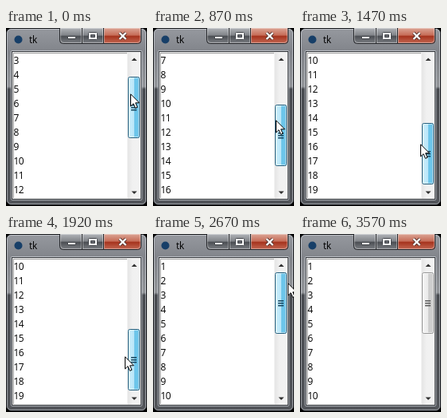
An HTML page with a canvas for the animation above (4030 ms loop, 177x223 px).

```html
<!DOCTYPE html>
<html lang="en">
<head>
<meta charset="utf-8">
<title>tk</title>
<style>
  html, body { margin: 0; width: 100%; height: 100%; overflow: hidden; background: #000; }
  canvas { display: block; }
</style>
</head>
<body>
<canvas id="stage" width="177" height="223"></canvas>
<script>
const ctx = document.getElementById('stage').getContext('2d');
const LOOP = 4030, STEP = 150, LEAD = 30;
const TOP = 48, THUMB = 77, ROW_TRAVEL = 7.9, ROWS = 10, ROW_HEIGHT = 18;
const RELEASE = 21, GONE = 24; // steps: pointer on the window edge, pointer hidden

// Key points as [step, ...values], joined by straight lines
const thumbPath = [[0, 61], [1, 68], [4, 83], [8, 108], [9, 119], [13, 119], [16, 80], [18, TOP]];
const pointerPath = [
  [0, 156, 82], [4, 155, 102], [8, 153, 127], [12, 148, 163], [13, 149, 153],
  [16, 164, 96], [18, 169, 61], [20, 174, 35], [21, 172, 122], [22, 164, 154], [23, 160, 202]
];

function along(path, step) {
  const next = path.findIndex(key => key[0] > step);
  if (next < 0) return path[path.length - 1].slice(1);
  const [from, to] = [path[next - 1], path[next]];
  const part = (step - from[0]) / (to[0] - from[0]);
  return from.slice(1).map((v, i) => Math.round(v + (to[i + 1] - v) * part));
}

function gradient(x0, y0, x1, y1, stops) {
  const g = ctx.createLinearGradient(x0, y0, x1, y1);
  for (const [at, color] of stops) g.addColorStop(at, color);
  return g;
}

function box(x, y, w, h, fill) {
  ctx.fillStyle = fill;
  ctx.fillRect(x, y, w, h);
}

function paint(fill, stroke) {
  if (fill) { ctx.fillStyle = fill; ctx.fill(); }
  if (stroke) { ctx.strokeStyle = stroke; ctx.lineWidth = 1; ctx.stroke(); }
}

function round(x, y, w, h, radius, fill, stroke) {
  ctx.beginPath();
  ctx.roundRect(x + .5, y + .5, w - 1, h - 1, radius);
  paint(fill, stroke);
}

function polygon(points, fill, stroke) {
  ctx.beginPath();
  for (const [x, y] of points) ctx.lineTo(x, y);
  ctx.closePath();
  paint(fill, stroke);
}

function text(content, x, y, spacing) {
  ctx.fillStyle = '#000';
  ctx.font = '12px "Open Sans", sans-serif';
  ctx.letterSpacing = spacing + 'px';
  ctx.fillText(content, x, y);
}

function captionButton(x, w, radius, light, upper, lower) {
  const shine = gradient(0, 0, 0, 20, [[0, light], [.46, upper], [.5, lower], [1, upper]]);
  round(x, -1, w, 21, radius, shine, '#24262a');
  round(x + 1, 0, w - 2, 19, radius, null, 'rgba(255,255,255,.38)');
}

function drawCross(x, y, color, width) {
  ctx.strokeStyle = color;
  ctx.lineWidth = width;
  ctx.beginPath();
  for (const side of [-4, 4]) {
    ctx.moveTo(x - side, y - 4);
    ctx.lineTo(x + side, y + 4);
  }
  ctx.stroke();
}

function drawWindow() {
  box(0, 0, 177, 223, '#000');
  round(0, 0, 177, 222, 6, gradient(0, 0, 0, 222,
    [[0, '#96999f'], [.13, '#82858b'], [.33, '#94979b'], [.345, '#4b4e53'], [1, '#53565b']]), '#15171a');
  round(1, 1, 175, 220, 5, null, 'rgba(220,225,230,.55)');

  ctx.beginPath();
  ctx.arc(15.5, 14.5, 5, 0, Math.PI * 2);
  paint('#173f68');
  text('tk', 29, 19, -.3);

  captionButton(67, 29, [0, 0, 0, 4], '#b0b3b7', '#808388', '#4a4d52');
  captionButton(95, 28, 0, '#b0b3b7', '#808388', '#4a4d52');
  captionButton(122, 48, [0, 0, 4, 0], '#dba494', '#c66c57', '#a5321c');
  round(77, 10, 11, 4, 0, '#fff', '#45484d');
  round(103, 5, 12, 10, 1, '#fff', '#45484d');
  round(106, 8, 6, 4, 0, '#666970', '#45484d');
  drawCross(146.5, 10, '#56352f', 4);
  drawCross(146.5, 10, '#fff', 2.3);

  round(6, 28, 165, 188, 1, null, 'rgba(220,225,230,.65)');
  box(7, 29, 163, 186, '#33363a');
  box(8, 30, 161, 184, '#f0f0f0');
  box(9, 31, 143, 182, '#a0a0a0');
  box(10, 32, 142, 181, '#fff');
}

function drawList(first) {
  for (let i = 0; i < ROWS; i++) text(first + i, 9.5, 45 + i * ROW_HEIGHT, -.7);
}

function drawScrollbar(top, pressed) {
  box(153, 31, 16, 183, gradient(153, 0, 169, 0, [[0, '#e5e5e5'], [.35, '#f0f0f0'], [1, '#f3f3f3']]));
  for (const [y, tip] of [[41, 37.5], [204.5, 208]]) {
    polygon([[157.5, y], [161, tip], [164.5, y]], '#303030');
  }
  const [light, mid, dark, border, grip] = pressed
    ? ['#d0f0fc', '#b6e5f8', '#6cc5ea', '#24607f', '#17465f']
    : ['#f6f6f6', '#e9e9e9', '#cdcdcd', '#979797', '#5c5c5c'];
  round(153, top, 15, THUMB, 2,
    gradient(154, 0, 168, 0, [[0, light], [.48, mid], [.5, dark], [1, dark]]), border);
  round(154, top + 1, 13, THUMB - 2, 1, null, 'rgba(255,255,255,.5)');
  for (let y = top + 35; y <= top + 41; y += 3) box(157, y, 7, 1.5, grip);
}

function drawArrow(x, y) {
  const shape = [[.5, .8], [.5, 16], [4, 12.7], [6.5, 18.4], [9, 17.3], [6.6, 11.8], [11.4, 11.8]];
  polygon(shape.map(([dx, dy]) => [x + dx, y + dy]), '#fff', '#000');
}

function drawResize(x, y) {
  const wing = [[-11, 0], [-6, -4], [-6, -1.5]];
  const flip = (sx, sy) => wing.map(([dx, dy]) => [x + .5 + dx * sx, y + .5 + dy * sy]);
  polygon([...flip(1, 1), ...flip(-1, 1).reverse(),
    ...flip(-1, -1), ...flip(1, -1).reverse()], '#fff', '#000');
}

function draw(time) {
  const step = Math.floor((time % LOOP + LEAD) / STEP);
  const [top] = along(thumbPath, step);
  const [x, y] = along(pointerPath, step);
  drawWindow();
  drawList(1 + Math.round((top - TOP) / ROW_TRAVEL));
  drawScrollbar(top, step < RELEASE);
  if (step === RELEASE) drawResize(x, y);
  else if (step < GONE) drawArrow(x, y);
}

function tick() {
  draw(performance.now());
  requestAnimationFrame(tick);
}
tick();
</script>
</body>
</html>
```
